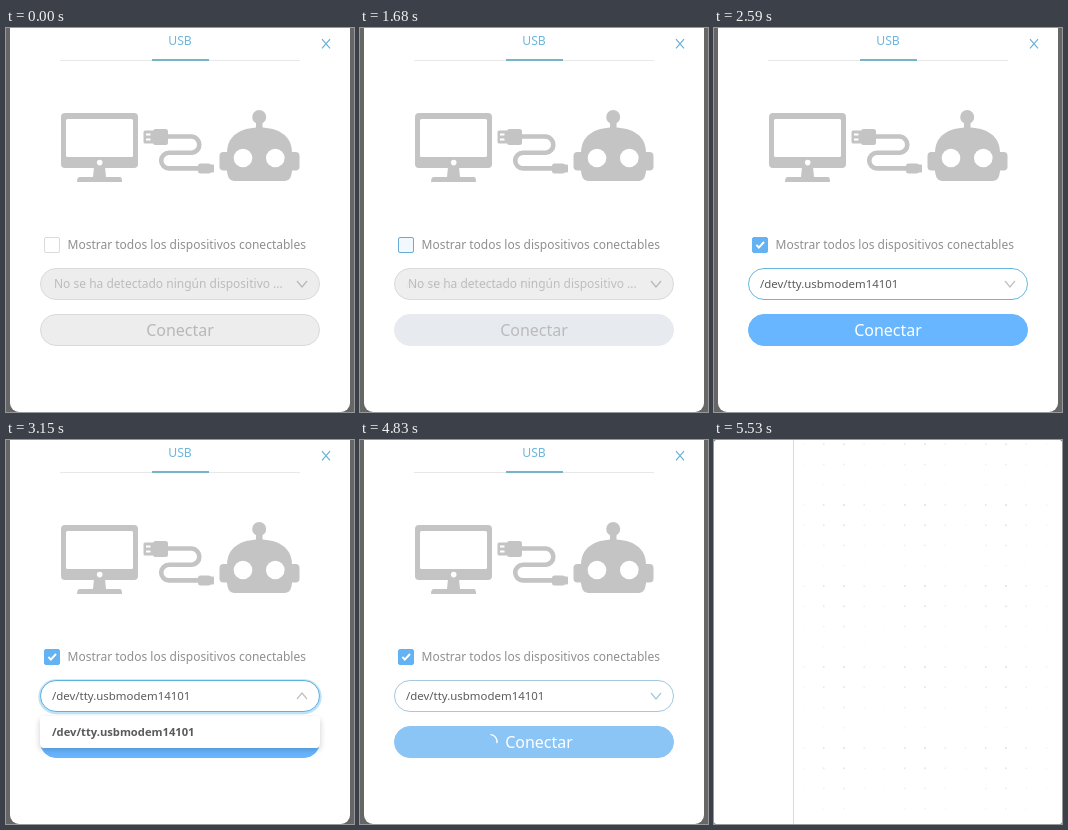
An HTML page for the animation above (6720 ms loop, 348 px wide and 384 px high).

```html
<!DOCTYPE html>
<html lang="es">
<head>
<meta charset="utf-8">
<title>Conectar dispositivo</title>
<style>
  html, body { margin: 0; width: 100%; height: 100%; overflow: hidden; background: #fff; }
  svg { display: block; width: 100vw; height: 100vh; }
  text { font-family: "Noto Sans", "Open Sans", sans-serif; font-size: 12px; }
</style>
</head>
<body>
<svg viewBox="0 0 348 384" xmlns="http://www.w3.org/2000/svg">
  <defs>
    <filter id="soft" x="-10%" y="-60%" width="120%" height="220%">
      <feGaussianBlur stdDeviation="3"/>
    </filter>
  </defs>

  <!-- workspace -->
  <rect width="348" height="384" fill="#777"/>
  <rect width="348" height="384" rx="2.5" fill="#fff"/>
  <path d="M79.5 0V384" stroke="#d9d9d9"/>
  <g id="dots" fill="#dedede"></g>

  <g id="modal">
    <rect width="348" height="384" fill="#666"/>
    <rect x="4" y="-20" width="340" height="404" rx="9" fill="#fff"/>

    <!-- header -->
    <path d="M54 32.5H294" stroke="#e8e8e8"/>
    <path d="M146 32H203" stroke="#78b4c8" stroke-width="2"/>
    <text x="174" y="17" text-anchor="middle" font-weight="500" fill="#6cb6de" style="font-size:12.2px">USB</text>
    <path d="M316 11.2L324 20.4M324 11.2L316 20.4" stroke="#68b0d8" stroke-width="1.2"/>

    <!-- computer -->
    <g fill="#c4c4c4">
      <rect x="55" y="85" width="77" height="55" rx="4"/>
      <path d="M88 139H99L100 149H114Q116 149 116 154H71Q71 149 74 149H87Z"/>
    </g>
    <rect x="60" y="91" width="67" height="38" rx="1.5" fill="#fff"/>
    <circle cx="93.7" cy="134.6" r="2.8" fill="#fff"/>

    <!-- cable -->
    <path d="M160 108.5H186A8.2 8.2 0 0 1 186 124.8H163A7.8 7.8 0 0 0 163 140.4H194" fill="none" stroke="#c4c4c4" stroke-width="4.6"/>
    <g fill="#c4c4c4">
      <rect x="137.5" y="102.5" width="11" height="13" rx="1.5"/>
      <rect x="147" y="101" width="15" height="16" rx="2.5"/>
      <rect x="192" y="135.5" width="13" height="10" rx="2.5"/>
      <rect x="203" y="136.5" width="5" height="8" rx="1"/>
    </g>
    <path d="M140 106.5H144.5M140 111.5H144.5" stroke="#fff" stroke-width="2"/>

    <!-- robot -->
    <g fill="#c4c4c4">
      <circle cx="253.2" cy="89" r="7"/>
      <rect x="250" y="94" width="6.5" height="8"/>
      <path d="M221 125C221 108 234 99.5 253.5 99.5S286 108 286 125V144H221Z"/>
      <rect x="213.5" y="124" width="12" height="18.5" rx="4"/>
      <rect x="281.5" y="124" width="12" height="18.5" rx="4"/>
      <path d="M221 141H286Q286 153 279 153H228Q221 153 221 141Z"/>
    </g>
    <circle cx="237" cy="130" r="9.3" fill="#fff"/>
    <circle cx="269.3" cy="130" r="9.3" fill="#fff"/>

    <!-- checkbox -->
    <rect id="box" x="38.5" y="209.5" width="15" height="15" rx="1.5"/>
    <path id="tick" d="M-3.6 -.2L-1.2 2.6L4 -3" fill="none" stroke="#fff" stroke-width="2"/>
    <text x="61.5" y="221" fill="#8f8f8f">Mostrar todos los dispositivos conectables</text>

    <!-- button -->
    <rect id="btn" x="34.5" y="286.5" width="279" height="31" rx="15.5"/>
    <text id="btnText" y="308" text-anchor="middle" style="font-size:16px">Conectar</text>
    <path id="spin" d="M0 -7A7 7 0 0 1 7 0" fill="none" stroke="#fff" stroke-width="1.4" stroke-linecap="round"/>

    <!-- select -->
    <rect id="glow" x="34" y="241" width="280" height="31.5" rx="16" fill="none" stroke="#62b5ea" stroke-width="3.4"/>
    <rect id="sel" x="34.5" y="240.5" width="279" height="31" rx="15.5"/>
    <text id="none" x="48" y="260" fill="#bcbcbc">No se ha detectado ningún dispositivo ...</text>
    <text id="port" x="46" y="260" fill="#5c5c5c" style="font-size:11.45px">/dev/tty.usbmodem14101</text>
    <path id="arrow" d="M-5 -3L0 3L5 -3" fill="none" stroke-width="1.2"/>

    <!-- dropdown -->
    <g id="menu">
      <rect x="34" y="279" width="280" height="31" rx="4" opacity=".2" filter="url(#soft)"/>
      <rect x="34" y="276" width="280" height="32" rx="4" fill="#fff"/>
      <text x="46" y="296" font-weight="600" fill="#5a5a5a" style="font-size:11.2px">/dev/tty.usbmodem14101</text>
    </g>
  </g>
</svg>
<script>
const LOOP = 6720;
const $ = id => document.getElementById(id);
const set = (id, attrs) => {
  for (const k in attrs) $(id).setAttribute(k, attrs[k]);
};

// eased progress from 0 to 1 between two times
const ramp = (t, a, b) => {
  const p = Math.min(1, Math.max(0, (t - a) / (b - a)));
  return p * p * (3 - 2 * p);
};
const mix = (a, b, p) =>
  `rgb(${a.map((v, i) => Math.round(v + (b[i] - v) * p)).join()})`;
const blend = (t, first, ...steps) => {
  let from = first;
  for (const [color, a, b] of steps) {
    if (t < b) return mix(from, color, ramp(t, a, b));
    from = color;
  }
  return mix(from, from, 0);
};

const WHITE = [255, 255, 255], OFF = [237, 237, 237], LINE = [218, 218, 218],
      BLUE = [98, 178, 244], FOCUS = [90, 178, 222], BUTTON = [104, 182, 255],
      HOVER = [111, 192, 255], BUSY = [139, 197, 246], GREY = [184, 184, 184];

// grid dots fade in a repeating rhythm of four columns and four rows
const colFade = [.3, .8, 1, .5], rowFade = [.8, .5, .3, 1];
let dots = '';
for (let i = 0; i < 13; i++) {
  for (let j = 0; j < 19; j++) {
    const o = colFade[i % 4] * rowFade[j % 4];
    dots += `<circle cx="${89.5 + 20.25 * i}" cy="${4.2 + 20.25 * j}" r=".95" opacity="${o.toFixed(2)}"/>`;
  }
}
$('dots').innerHTML = dots;

function draw(t) {
  const checked = ramp(t, 1660, 1780);
  const ready = ramp(t, 1660, 1820);
  const open = ramp(t, 2780, 2990) - ramp(t, 3830, 4060);
  const turn = ramp(t, 2780, 3120) - ramp(t, 3830, 4180);
  const focus = ramp(t, 2780, 3100) - ramp(t, 4600, 4860);
  const load = ramp(t, 4670, 4830);

  set('box', {
    fill: mix(WHITE, BLUE, checked),
    stroke: blend(t, LINE, [[103, 172, 207], 930, 1050], [BLUE, 1660, 1780])
  });
  set('tick', {
    transform: `translate(46 217) scale(${.5 + .5 * ramp(t, 1670, 1900)})`,
    opacity: checked
  });

  const face = blend(t, OFF, [BUTTON, 1660, 1820], [HOVER, 3850, 4200], [BUSY, 4620, 4830]);
  set('btn', { fill: face, stroke: t < 1660 ? mix(LINE, LINE, 0) : face });
  set('btnText', { x: 174 + 5 * load, fill: mix(GREY, WHITE, ready) });
  set('spin', {
    transform: `translate(130 301.5) rotate(${(t - 4830) * .36 + 8})`,
    opacity: load
  });

  set('sel', {
    fill: mix(OFF, WHITE, ready),
    stroke: blend(t, LINE, [FOCUS, 2310, 2660], [LINE, 4620, 5000])
  });
  set('glow', { opacity: .4 * focus });
  set('none', { opacity: 1 - ready });
  set('port', { opacity: ready });
  set('arrow', {
    transform: `translate(296 256) scale(1 ${1 - 2 * turn})`,
    stroke: blend(t, GREY, [[192, 192, 192], 1660, 1820],
      [[158, 203, 217], 4620, 4830], [[192, 192, 192], 4830, 5100])
  });

  set('menu', {
    transform: `translate(0 276) scale(1 ${.8 + .2 * open}) translate(0 -276)`,
    opacity: open
  });
  set('modal', { opacity: 1 - ramp(t, 5270, 5530) });
}

const start = performance.now();
function tick() {
  draw((performance.now() - start) % LOOP);
  requestAnimationFrame(tick);
}
tick();
</script>
</body>
</html>
```
